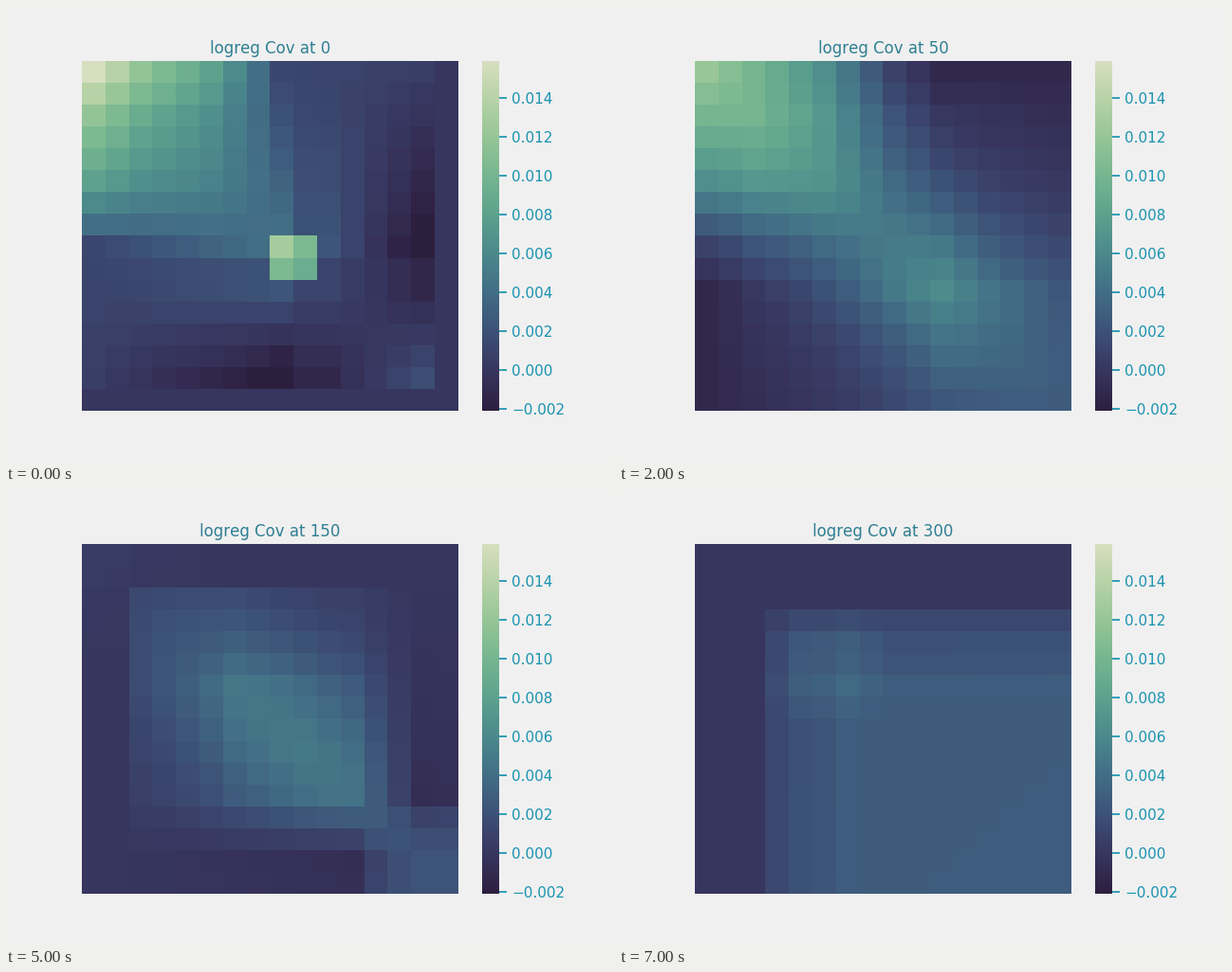
Write a matplotlib script that moves like this. It is 640 px wide and 480 px high and loops after 8 s.

```python
import numpy as np
import matplotlib.pyplot as plt
from matplotlib.animation import FuncAnimation
from matplotlib.colors import ListedColormap

BACK, TITLE, TICK = "#f0f0f0", "#2f7f93", "#1a93b0"
VMIN, VMAX = -0.00209, 0.01594
CELLS = np.arange(16)
LAG = np.abs(CELLS[:, None] - CELLS)

plt.rcParams.update({"font.family": "DejaVu Sans", "text.kerning_factor": 6})


def helix_map(start=0.5, rot=-0.75, hue=0.8, dark=0.15, light=0.85):
    """Cubehelix ramp from dark violet to pale green."""
    x = np.linspace(dark, light, 256)[:, None]
    amp = hue * x * (1 - x) / 2
    phi = 2 * np.pi * (start / 3 + rot * x)
    p = np.array([-0.14861, -0.29227, 1.97294])
    q = np.array([1.78277, -0.90649, 0.0])
    rgb = x + amp * (p * np.cos(phi) + q * np.sin(phi))
    return ListedColormap(np.clip(rgb, 0, 1))


def factor(*points, reach=np.inf):
    """Covariance of one deviation profile, fading with lag beyond reach."""
    profile = np.interp(CELLS, *zip(*points))
    return np.outer(profile, profile) / (1 + (LAG / reach) ** 2) * 1e-4


cov = {
    # early signal, a slow drift and one noisy spot
    0: factor((0, 12.6), (2, 9.4), (5, 6.4), (7, 3.3), (8, 1), (14, 0.5), (15, 0))
    + factor((0, 0), (7, 5.4), (8, 6.9), (9, 3.2), (10, 3.2), (14, -4.2), (15, 0))
    + factor((7, 0), (8, 9), (9, 9), (10, 0)),
    # early signal giving way to a diagonal ridge
    50: factor((0, 11), (2, 9.1), (5, 5.9), (8, 0.8), (10, -1.1))
    + factor((0, 0), (2, 4.1), (5, 5.8), (10, 7.8), (12, 6.2), (15, 5.1), reach=6),
    # late block, middle block, small corner
    75: factor((0, 0.3), (5, -0.6), (7, 3.5), (9, 6.7), (11, 8.8), (15, 10.1))
    + factor((0, -1), (2, 3.2), (3, 6.7), (5, 7.4), (9, 4.2), (12, 0), reach=6)
    + factor((0, 2), (1, 3.2), (2, 3.7), (3, 0)),
    # late block against an opposed early block
    100: factor((0, 0.2), (5, -1), (6, -1), (7, 1.6), (8, 3.9), (10, 6.7),
                (12, 8.3), (15, 9.3))
    + factor((0, 2.8), (2, 5.5), (5, 5.4), (6, 1.9), (7, -2.6), (8, -2.9), (15, 0))
    + factor((6, 0), (7, 3), (8, 3.2), (12, 0.5)),
    # central ridge and a late corner
    150: factor((1, 0), (2, 3.5), (5, 5.7), (6, 6.8), (9, 6.9), (11, 6.6),
                (12, 4.3), (14, -1.2), reach=6)
    + factor((11, 0), (12, 3), (13, 4.3), (14, 4.6))
    + factor((0, 2.2), (5, 0)),
    # wide plateau with a slightly raised shoulder
    300: factor((2, 0), (3, 2.5), (4, 3.8), (5, 4.3), (6, 5.4), (7, 5.2), (15, 5.3))
    + factor((2, 0), (3, 1.4), (4, 3.2), (6, 2.8), (8, 0)),
}

# Steps between two known states
cov[25] = 0.4 * cov[0] + 0.6 * cov[50]
cov[200] = cov[300].copy()
cov[200][5:, 5:] += 0.3 * (cov[150] - cov[300])[5:, 5:]
steps = sorted(cov)

fig, ax = plt.subplots(figsize=(6.4, 4.8), dpi=100, facecolor=BACK)
mesh = ax.pcolormesh(cov[0], cmap=helix_map(), vmin=VMIN, vmax=VMAX)
ax.invert_yaxis()
ax.set_axis_off()
title = ax.set_title("", fontsize=12, color=TITLE, pad=5.3)

bar = fig.colorbar(mesh, ax=ax, ticks=np.arange(-2, 16, 2) / 1000)
bar.outline.set_visible(False)
bar.ax.tick_params(length=6, width=1.25, pad=3.5, labelsize=11,
                   color=TICK, labelcolor=TICK)


def draw(i):
    step = steps[i]
    mesh.set_array(cov[step])
    title.set_text(f"logreg Cov at {step}")
    return mesh, title


anim = FuncAnimation(fig, draw, frames=len(steps), interval=1000,
                     repeat=True, repeat_delay=0)
plt.show()
```
